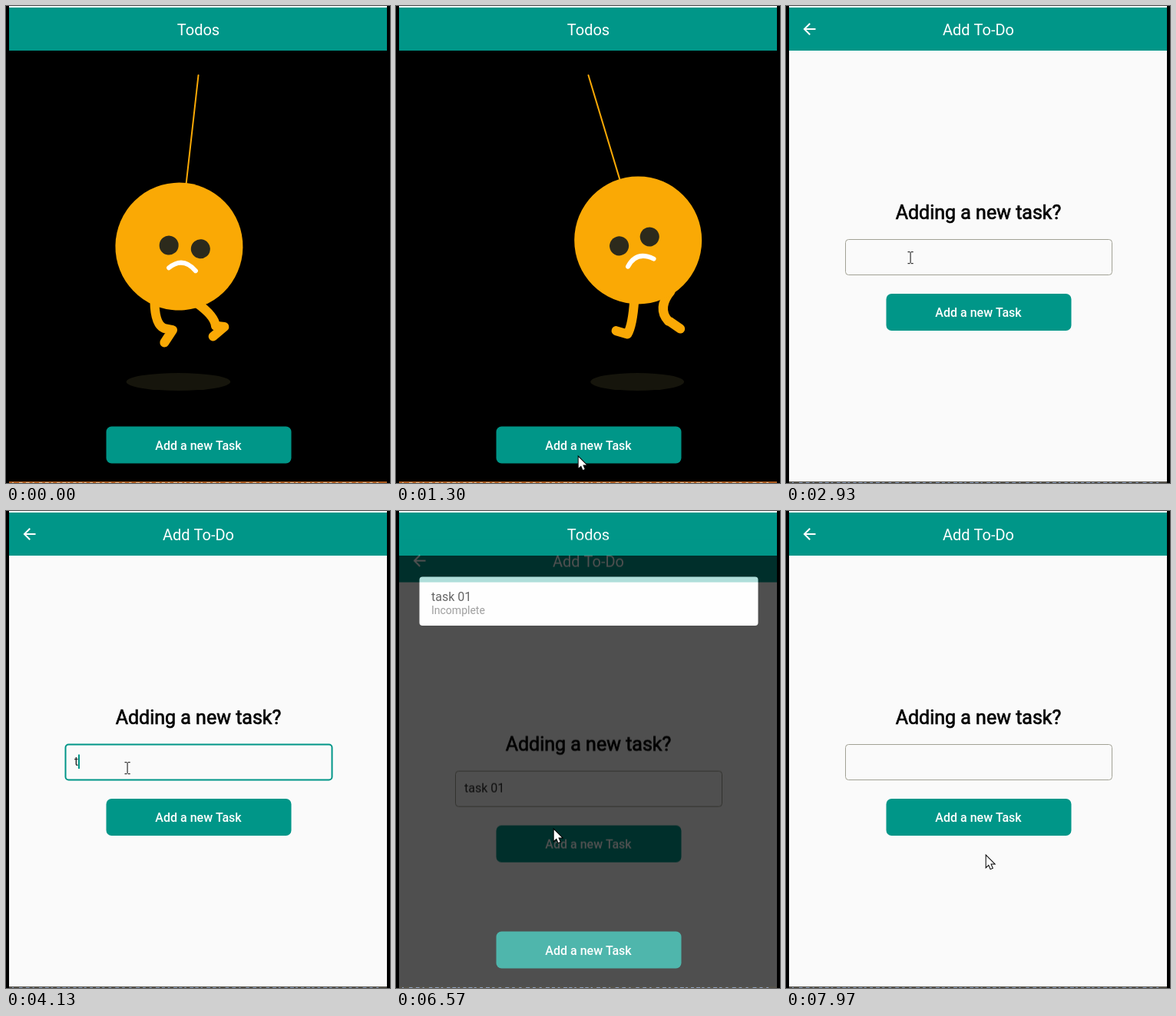
Recreate the animation shown at these times as an HTML page with a canvas. Size 500 px wide and 620 px high, loop 8000 ms.

```html
<!DOCTYPE html>
<html lang="en">
<head>
<meta charset="utf-8">
<title>Todos</title>
<style>
html, body { margin: 0; width: 500px; height: 620px; overflow: hidden; background: #000; }
canvas { display: block; }
</style>
</head>
<body>
<canvas id="stage" width="500" height="620"></canvas>
<script>
const LOOP = 8000;
const TEAL = [0, 150, 136], PAPER = [250, 250, 250], BLACK = [0, 0, 0], WHITE = [255, 255, 255];
const ORANGE = '#faa905';
const stage = document.getElementById('stage').getContext('2d');
const layer = document.createElement('canvas');
layer.width = 500;
layer.height = 620;
const sheet = layer.getContext('2d');

const clamp = v => Math.min(1, Math.max(0, v));
const lerp = (a, b, k) => a + (b - a) * k;
const rgb = c => `rgb(${c.map(Math.round).join(',')})`;
const mix = (a, b, k) => rgb(a.map((v, i) => lerp(v, b[i], k)));

function bezier(x1, y1, x2, y2) {
  const at = (a, b, s) => 3 * a * s * (1 - s) ** 2 + 3 * b * s * s * (1 - s) + s ** 3;
  return x => {
    if (x <= 0 || x >= 1) return clamp(x);
    let lo = 0, hi = 1;
    for (let i = 0; i < 24; i++) {
      const mid = (lo + hi) / 2;
      if (at(x1, x2, mid) < x) lo = mid; else hi = mid;
    }
    return at(y1, y2, lo);
  };
}
const slide = bezier(0.4, 0, 0.2, 1);
const fade = bezier(0.42, 0, 1, 1);

function text(c, str, x, y, size, color, weight = 400, align = 'left') {
  c.font = `${weight} ${size}px Roboto, sans-serif`;
  c.textAlign = align;
  c.fillStyle = color;
  c.fillText(str, x, y);
}

function box(c, x, y, w, h, r) {
  c.beginPath();
  c.roundRect(x, y, w, h, r);
}

function header(c, title) {
  c.fillStyle = rgb(TEAL);
  c.fillRect(4, 2, 492, 56);
  text(c, title, 250.5, 37.5, 20, rgb(WHITE), 400, 'center');
}

// A pressed button fades to 40 % over the page colour.
function button(c, y, back, press) {
  box(c, 130.5, y, 241, 48, 7);
  c.fillStyle = mix(TEAL, back, press * 0.6);
  c.fill();
  text(c, 'Add a new Task', 250.5, y + 30, 16, mix(WHITE, back, press * 0.6), 500, 'center');
}

const pressed = (t, down, up) => clamp((t - down) / 90) * (1 - clamp((t - up) / 180));

// Leg points: hip, knee, ankle, heel, toe; trailing right and trailing left.
const LEGS = [
  [[-24, 74, -21, 104, -10, 108, 1, 109, -8, 125], [-27, 72, -40, 104, -51, 113, -52, 113, -65, 103]],
  [[31, 71, 53, 85, 56, 98, 67, 98, 55, 112], [21, 76, -6, 92, 4, 113, 5, 114, 17, 127]]
];

function leg(c, [right, left], k) {
  const p = right.map((v, i) => lerp(left[i], v, k));
  c.beginPath();
  c.moveTo(p[0], p[1]);
  c.quadraticCurveTo(p[2], p[3], p[4], p[5]);
  c.lineTo(p[6], p[7]);
  c.lineTo(p[8], p[9]);
  c.stroke();
}

function disc(c, x, y, r, color) {
  c.fillStyle = color;
  c.beginPath();
  c.arc(x, y, r, 0, Math.PI * 2);
  c.fill();
}

function swing(c, t) {
  // The app stalls for a moment just before the press registers.
  const clock = t < 1870 ? t : 1870 + Math.max(0, t - 2030);
  const phase = (197 + clock / 2200 * 360) * Math.PI / 180;
  const angle = 22 * Math.PI / 180 * Math.sin(phase);
  const lag = -Math.cos(phase);
  const x = 250.5 + 224 * Math.sin(angle);

  c.fillStyle = '#16150c';
  c.beginPath();
  c.ellipse(x - 1, 488.5, 72 - Math.abs(angle) * 38, 11.5, 0, 0, Math.PI * 2);
  c.fill();

  c.save();
  c.translate(250.5, 90);
  c.rotate(-angle);
  c.lineCap = c.lineJoin = 'round';
  c.strokeStyle = ORANGE;
  c.lineWidth = 2;
  c.beginPath();
  c.moveTo(0, 0);
  c.lineTo(0, 150);
  c.stroke();

  c.translate(0, 224);
  c.lineWidth = 12;
  LEGS.forEach(l => leg(c, l, (lag + 0.75) / 1.62));
  disc(c, 0, 0, 83, ORANGE);

  c.translate(lag * 7.7, 0);
  disc(c, -20.7, 0, 12.5, '#2c2a1c');
  disc(c, 20.7, 0, 12.5, '#2c2a1c');
  c.strokeStyle = rgb(WHITE);
  c.lineWidth = 6;
  c.beginPath();
  c.moveTo(-17.5, 29);
  c.quadraticCurveTo(-1, 12, 17.5, 29);
  c.stroke();
  c.restore();
}

function home(c, t) {
  c.fillStyle = '#000';
  c.fillRect(4, 2, 492, 616);
  header(c, 'Todos');
  if (t < 4000) {
    swing(c, t);
  } else {
    box(c, 30.5, 85.5, 441, 63.5, 4);
    c.fillStyle = '#fff';
    c.fill();
    text(c, 'task 01', 46, 117, 16, '#212121');
    text(c, 'Incomplete', 46, 134, 14, '#757575');
  }
  const press = t < 2030 ? 0 : t < 4000 ? pressed(t, 1930, 2090) : pressed(t, 7540, 7720);
  button(c, 546.5, BLACK, press);
}

const KEYS = [[4130, 1], [4200, 2], [4270, 3], [4330, 4], [4470, 5], [5070, 6], [5270, 7]];

function typed(t) {
  if (t > 7000) return '';
  const n = KEYS.reduce((len, [at, count]) => t >= at ? count : len, 0);
  return 'task 01'.slice(0, n);
}

function caretOn(t) {
  return t < 3830 || (t >= 4130 && t < 5730) || t >= 6230;
}

function backArrow(c) {
  c.save();
  c.translate(18.5, 18);
  c.fillStyle = rgb(WHITE);
  c.fill(new Path2D('M20 11H7.83l5.59-5.59L12 4l-8 8 8 8 1.41-1.41L7.83 13H20z'));
  c.restore();
}

function heading(c) {
  const str = 'Adding a new task?';
  text(c, str, 250.5, 277, 25, '#050505', 400, 'center');
  c.strokeStyle = '#050505';
  c.lineWidth = 0.7;
  c.strokeText(str, 250.5, 277);
}

function addPage(c, t) {
  c.fillStyle = rgb(PAPER);
  c.fillRect(4, 2, 492, 616);
  header(c, 'Add To-Do');
  backArrow(c);
  heading(c);

  const focus = t >= 3350 && t < 6300;
  box(c, 77.5, 303.5, 347, 46, 4);
  c.lineWidth = focus ? 2 : 1;
  c.strokeStyle = focus ? rgb(TEAL) : '#a2a295';
  c.stroke();
  const str = typed(t);
  text(c, str, 89, 331, 16, '#2b2b2b');
  if (focus && caretOn(t)) {
    c.fillStyle = rgb(TEAL);
    c.fillRect(89 + Math.round(c.measureText(str).width), 316.5, 2, 18.5);
  }
  button(c, 374, PAPER, pressed(t, 6220, 6320));
}

// How far the second page has come in, 0 to 1.
function shown(t) {
  if (t < 6420) return clamp((t - 2100) / 300);
  if (t < 7770) return 1 - clamp((t - 6420) / 300);
  return clamp((t - 7670) / 300);
}

const TRACK = [
  [700, 219, 617], [730, 219, 610], [830, 222, 600], [1100, 232, 588], [1670, 250, 577],
  [2100, 250, 577], [2400, 215, 160], [2570, 215, 160], [2900, 162, 327], [2950, 162, 327],
  [3100, 158, 334], [5870, 158, 334], [6200, 205, 413], [6680, 205, 413],
  [7220, 258, 572], [7700, 258, 572], [7960, 260, 447], [8000, 260, 447]
];

function outline(c, path) {
  c.lineJoin = 'miter';
  c.strokeStyle = '#000';
  c.lineWidth = 2;
  c.stroke(path);
  c.fillStyle = '#fff';
  c.fill(path);
}

const ARROW = new Path2D('M.7 1.2V15.6L4 12.5 6.4 18 8.7 17 6.3 11.6H11z');
const RESIZE = new Path2D('M0 0L4 4.5H.8V18H-.8V4.5H-4z');

function cursor(c, t) {
  if (t < TRACK[0][0]) return;
  const i = TRACK.findIndex(k => k[0] > t);
  const [a, b] = [TRACK[i - 1], TRACK[i]];
  const u = (t - a[0]) / (b[0] - a[0]);
  const k = u * u * (3 - 2 * u);
  const x = lerp(a[1], b[1], k), y = lerp(a[2], b[2], k);
  const overField = t > 2400 && t < 6420 && x > 77 && x < 425 && y > 303 && y < 350;
  c.save();
  c.translate(Math.round(x), Math.round(y));
  if (overField) {
    c.fillStyle = '#303030';
    c.fillRect(-0.5, -7, 1.2, 14);
    c.fillRect(-3.5, -8, 3, 1.2);
    c.fillRect(0.7, -8, 3, 1.2);
    c.fillRect(-3.5, 7, 3, 1.2);
    c.fillRect(0.7, 7, 3, 1.2);
  } else {
    outline(c, t < 800 ? RESIZE : ARROW);
  }
  c.restore();
}

function frameEdges(c, t) {
  c.fillStyle = '#000';
  c.fillRect(0, 0, 4, 620);
  c.fillRect(496, 0, 4, 620);
  c.fillStyle = '#f8faf8';
  c.fillRect(4, 0, 492, 2);
  c.fillStyle = t < 2030 ? '#a9591d' : '#55524a';
  c.fillRect(4, 618, 492, 2);
  c.fillStyle = t < 2030 ? '#d9b894' : '#8fa3c4';
  for (let i = 0; i < 60; i++) {
    const x = 8 + i * 8 + Math.sin(i * 12.9) * 3;
    c.fillRect(x, 619, 2 + Math.abs(Math.sin(i * 7.3)) * 3, 1);
  }
}

function draw(now) {
  const t = now % LOOP;
  const v = shown(t);
  stage.globalAlpha = 1;
  stage.fillStyle = '#000';
  stage.fillRect(0, 0, 500, 620);
  if (v < 1) home(stage, t);
  if (v > 0) {
    sheet.clearRect(0, 0, 500, 620);
    addPage(sheet, t);
    stage.globalAlpha = fade(v);
    stage.drawImage(layer, 0, 154 * (1 - slide(v)));
    stage.globalAlpha = 1;
  }
  frameEdges(stage, t);
  cursor(stage, t);
}

let start;
function tick(now) {
  if (start === undefined) start = now;
  draw(now - start);
  requestAnimationFrame(tick);
}
draw(0);
requestAnimationFrame(tick);
</script>
</body>
</html>
```
